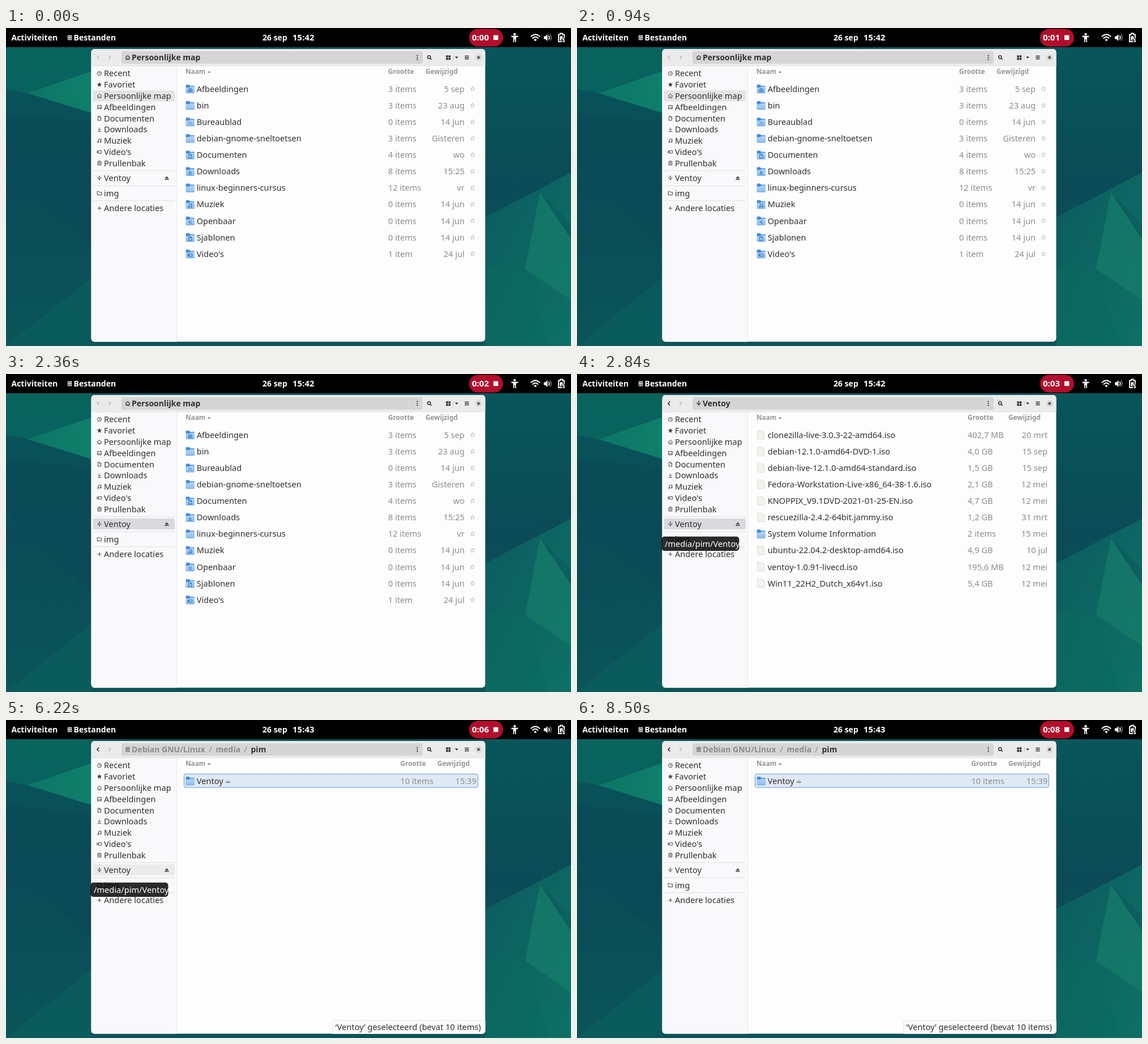
Recreate the animation shown at these times as an HTML page. Size 998 by 561 pixels, loop 8890 ms.

```html
<!DOCTYPE html>
<html lang="nl">
<head>
<meta charset="utf-8">
<title>Bestanden</title>
<style>
html, body { margin: 0; width: 100%; height: 100%; overflow: hidden; background: #0a4f59; }
svg { display: block; width: 100vw; height: 100vh; }
text { font: 14.6px "Noto Sans", sans-serif; fill: #303030; white-space: pre; }
.bold { font-weight: 700; font-size: 14px; }
.time { font-weight: 700; font-size: 15px; }
.head { font-weight: 700; font-size: 11.8px; fill: #969696; }
.dim { fill: #8c8c8c; }
.white { fill: #fff; }
.end { text-anchor: end; }
</style>
</head>
<body>
<svg id="stage" viewBox="0 0 998 561" preserveAspectRatio="none"></svg>
<script>
const LOOP = 8890;
const USER = 'pim';

// Outline icons, centred on the origin, about 8 units wide
const ICONS = {
  clock: 'M-3.5 0a3.5 3.5 0 1 0 7 0a3.5 3.5 0 1 0-7 0M0-2V0H1.8',
  home: 'M-3.8 0L0-3.4L3.8 0M-2.8-.6V3.4H2.8V-.6M0 3.2V1',
  image: 'M-3.3-3H3.3V3H-3.3ZM-2.6 2L-.8 0L.5 1.3L1.6 .3L2.8 2M1.3-1.4h.4',
  doc: 'M-2.6-3.6H.6L2.6-1.5V3.6H-2.6ZM.4-3.4V-1.3H2.4',
  down: 'M0-3.5V1.4M-2.2-.7L0 1.5L2.2-.7M-3.3 3.5H3.3',
  music: 'M-1.4 2V-2.4L3-3.2V1.4M-3.1 2.2a.9 .9 0 1 0 1.7 0a.9 .9 0 1 0-1.7 0M1.2 1.6a.9 .9 0 1 0 1.7 0a.9 .9 0 1 0-1.7 0',
  video: 'M-1.8-2.3H3.5V2.3H-1.8ZM-1.8 0L-4-2V2Z',
  trash: 'M-3.6-2.4H3.6M-1.2-2.6V-3.6H1.2V-2.6M-2.8-2.2V3.5H2.8V-2.2M-.9-.6V2M.9-.6V2',
  usb: 'M0-4V4M-2.7-1.7V.2L0 2L2.7 .2V-1.7M-1-2.8L0-4L1-2.8',
  folder: 'M-3.8 3V-3H-.8L.2-1.8H3.8V3Z',
  plus: 'M-3.5 0H3.5M0-3.5V3.5',
  disk: 'M-3-3.6H3V3.6H-3ZM-1.4-1.8H1.4V.4H-1.4ZM-1.4 2H1.4',
  share: 'M2.4-2.6L-2.2 0L2.4 2.6M2-2.6h.8M-2.6 0h.8M2 2.6h.8',
  desk: 'M-3.2-2h1M2.2-2h1M-.5-2h1M-3.2 2.4h1M2.2 2.4h1M-1.2 .8L0-.6L1.2 .8',
  camera: 'M-3.2-1.8H-1.5L-1-2.8H1L1.5-1.8H3.2V2.8H-3.2ZM-1.2 .5a1.2 1.2 0 1 0 2.4 0a1.2 1.2 0 1 0-2.4 0',
  back: 'M1.7-3.4L-1.7 0L1.7 3.4',
  next: 'M-1.7-3.4L1.7 0L-1.7 3.4',
  search: 'M-3.3-.7a2.6 2.6 0 1 0 5.2 0a2.6 2.6 0 1 0-5.2 0M1.2 1.3L3.7 3.8',
  menu: 'M-3.6-2.6H3.6M-3.6 0H3.6M-3.6 2.6H3.6',
  close: 'M-2-2L2 2M2-2L-2 2'
};

const rect = (x, y, w, h, fill, more = '') =>
  `<rect x="${x}" y="${y}" width="${w}" height="${h}" fill="${fill}" ${more}/>`;
const path = (d, fill, more = '') => `<path d="${d}" fill="${fill}" ${more}/>`;
const text = (x, y, content, cls = '', more = '') =>
  `<text x="${x}" y="${y}" class="${cls}" ${more}>${content}</text>`;
const at = (x, y, body) => `<g transform="translate(${x} ${y})">${body}</g>`;
const icon = (name, x, y, color = '#444', width = 1) =>
  at(x, y, path(ICONS[name], 'none', `stroke="${color}" stroke-width="${width}" stroke-linejoin="round"`));
const group = (id, body) => `<g id="${id}">${body}</g>`;

function star(x, y, r, fill, stroke = 'none') {
  const points = Array.from({ length: 10 }, (_, i) => {
    const a = (i / 5 - .5) * Math.PI, d = i % 2 ? r * .45 : r;
    return `${(x + d * Math.cos(a)).toFixed(2)},${(y + d * Math.sin(a)).toFixed(2)}`;
  });
  return `<polygon points="${points.join(' ')}" fill="${fill}" stroke="${stroke}" stroke-width=".7"/>`;
}

const eject = (x, y, color) => at(x, y, path('M-3.6 .8L0-3.4L3.6 .8ZM-3.6 1.8H3.6V3.2H-3.6Z', color));

function folder(x, y, emblem) {
  return at(x, y,
    path('M-7.5 6V-6.2Q-7.5-7.5-6.2-7.5H-1.7L-.2-5.5H6.3Q7.5-5.5 7.5-4.3V6Z', '#3f8ae0') +
    path('M-7.5-2.4H-1.6L0-4H7.5V6.3Q7.5 7.5 6.3 7.5H-6.3Q-7.5 7.5-7.5 6.3Z', 'url(#folderFront)') +
    path('M-7.3 7.1H7.3', 'none', 'stroke="#65a0df" stroke-width=".9"')) +
    (emblem ? icon(emblem, x, y + 2, '#2d78c8', 1.1) : '');
}

const page = (x, y) => at(x, y,
  path('M-6-7.5H2.5L6-4V7.5H-6Z', '#f3f3ee', 'stroke="#d9d9d3" stroke-width=".9"') +
  path('M2.5-7.5V-4H6Z', '#dfdfd9'));

function wallpaper() {
  return rect(0, 0, 998, 561, 'url(#base)') +
    path('M0 34H151V76L38 115L0 108Z', '#086a60', 'opacity=".65"') +
    path('M38 115L151 76V150Z', 'url(#leftBeam)') +
    path('M0 150L151 165V390L0 240Z', '#0a4655', 'opacity=".35"') +
    path('M0 561L151 440V561Z', '#0b6b60', 'opacity=".35"') +
    path('M846 334L998 255V561H846Z', 'url(#rightSlope)') +
    path('M943 290L917 425L998 480V372Z', '#18806c', 'opacity=".6"') +
    path('M943 290L998 372V345Z', '#0c5a5c', 'opacity=".6"') +
    path('M846 420L917 425L960 561H846Z', '#0a6a60', 'opacity=".55"');
}

function topBar() {
  const white = 'stroke="#fff" stroke-linecap="round"';
  return rect(0, 0, 998, 33.7, '#000') +
    text(9.5, 22, 'Activiteiten', 'bold white') +
    icon('disk', 112.5, 17, '#fff', 1.1) +
    text(119.5, 22, 'Bestanden', 'bold white') +
    text(453, 22, '26 sep', 'bold white') +
    text(506, 22, '', 'time white', 'id="clock"') +
    rect(818, 1.5, 60, 31, '#b30d2b', 'rx="15.5"') +
    text(823, 22, '', 'time white', 'id="counter"') +
    rect(861, 12.7, 8.4, 8.4, '#fff') +
    at(898.5, 17, '<circle cy="-6" r="2.2" fill="#fff"/>' +
      path('M-6-3.3H6V-1.2L2.5-.6V8H.8V3H-.8V8H-2.5V-.6L-6-1.2Z', '#fff')) +
    at(935, 17, path('M-7.5-2.2Q0-9 7.5-2.2M-4.6 .9Q0-3.4 4.6 .9', 'none', white + ' stroke-width="2.1"') +
      '<circle cy="4" r="2.1" fill="#fff"/>') +
    at(957, 17, path('M-7-2.5H-4.2L-.5-6V6L-4.2 2.5H-7Z', '#fff') +
      path('M1.8-2.7Q3.7 0 1.8 2.7', 'none', white + ' stroke-width="1.7"') +
      path('M4-5.5Q8 0 4 5.5', 'none', 'stroke="#888" stroke-width="1.5"')) +
    at(981, 17, path('M-5-5.5H-2V-7.5H2V-5.5H5V7H-5Z', 'none', 'stroke="#fff" stroke-width="1.9" stroke-linejoin="round"') +
      path('M-2.7-2.5H2.7V4.8H-2.7Z', '#fff') +
      path('M4-2L-.2 3.4H2.6L1.5 8L7 2H4Z', '#fff', 'stroke="#000" stroke-width="1"'));
}

function windowFrame() {
  return rect(150, 37.5, 697, 517, '#000', 'rx="6" opacity=".35"') +
    rect(150.5, 37, 696, 516.5, '#fdfdfd', 'rx="6"') +
    path('M150.5 67H301V553.5H156.5Q150.5 553.5 150.5 547.5Z', '#f9f9fb') +
    path('M150.5 67V43Q150.5 37 156.5 37H840.5Q846.5 37 846.5 43V67Z', '#ebebeb') +
    rect(301, 67, 1, 486.5, '#e9e9eb') +
    rect(150.5, 66.5, 696, .8, '#e2e2e2') +
    rect(204, 41, 532, 22, '#d5d5d5', 'rx="4"') +
    icon('next', 183, 52, '#b5b5b5', 1.2) +
    [-3.4, 0, 3.4].map(d => `<circle cx="726.5" cy="${52 + d}" r="1.1" fill="#333"/>`).join('') +
    icon('search', 748, 52, '#2b2b2b', 1.5) +
    [777.3, 781.7].map(x => [48.3, 52.7].map(y => rect(x, y, 3.5, 3.5, '#2b2b2b')).join('')).join('') +
    rect(789.7, 47, .8, 10, '#c8c8c8') +
    path('M793 50.5H799L796 53.8Z', '#2b2b2b') +
    icon('menu', 814, 52, '#2b2b2b', 1.3) +
    '<circle cx="834.7" cy="52" r="6" fill="#d9d9d9"/>' + icon('close', 834.7, 52, '#2b2b2b', 1.3);
}

function sidebar() {
  const places = [
    ['clock', 'Recent'], ['star', 'Favoriet'], ['home', 'Persoonlijke map'], ['image', 'Afbeeldingen'],
    ['doc', 'Documenten'], ['down', 'Downloads'], ['music', 'Muziek'], ['video', "Video's"],
    ['trash', 'Prullenbak']
  ].map(([name, label], i) => [name, label, 80.2 + 19.78 * i]);
  places.push(['usb', 'Ventoy', 264.9], ['folder', 'img', 291.5], ['plus', 'Andere locaties', 318]);
  const highlight = (id, y) => rect(153.5, y - 9.7, 144.5, 19.4, '#e4e4e6', `rx="3" id="${id}"`);
  return highlight('homeRow', 119.7) + highlight('usbRow', 264.5) +
    [251.2, 277.8, 304.3].map(y => rect(153.5, y, 144.5, .9, '#dcdcde')).join('') +
    places.map(([name, label, y]) =>
      (name === 'star' ? star(165, y, 4.6, '#444') : icon(name, 165, y)) + text(173, y + 5.2, label)).join('') +
    eject(284, 264.8, '#444');
}

const rowY = i => 107.5 + 29.1 * i;

function listing(columns, rows) {
  const { size, date, dateEnd, stars } = columns;
  return text(317, 81.3, 'Naam', 'head') + path('M355.5 79H362L358.7 75.5Z', '#969696') +
    text(size, 81.3, 'Grootte', 'head') + text(date, 81.3, 'Gewijzigd', 'head') +
    rows.map(([name, amount, changed, emblem], i) => {
      const y = rowY(i);
      return (name.endsWith('.iso') ? page(325, y) : folder(325.3, y, emblem)) +
        text(336.7, y + 5.2, name) + text(size, y + 5.2, amount, 'dim') +
        text(dateEnd, y + 5.2, changed, 'dim end') +
        (stars ? star(824, y, 4.2, 'none', '#a6a6a6') : '');
    }).join('');
}

function homeView() {
  return icon('back', 162.5, 52, '#b5b5b5', 1.2) + icon('home', 215, 52, '#333', 1.2) +
    text(222, 57.2, 'Persoonlijke map', 'bold') +
    listing({ size: 675, date: 741, dateEnd: 810, stars: true }, [
      ['Afbeeldingen', '3 items', '5 sep', 'camera'],
      ['bin', '3 items', '23 aug'],
      ['Bureaublad', '0 items', '14 jun', 'desk'],
      ['debian-gnome-sneltoetsen', '3 items', 'Gisteren'],
      ['Documenten', '4 items', 'wo', 'doc'],
      ['Downloads', '8 items', '15:25', 'down'],
      ['linux-beginners-cursus', '12 items', 'vr'],
      ['Muziek', '0 items', '14 jun', 'music'],
      ['Openbaar', '0 items', '14 jun', 'share'],
      ['Sjablonen', '0 items', '14 jun', 'doc'],
      ["Video's", '1 item', '24 jul', 'video']
    ]);
}

function usbView() {
  return icon('back', 162.5, 52, '#2b2b2b', 1.5) + icon('usb', 215, 52, '#333', 1.2) +
    text(222, 57.2, 'Ventoy', 'bold') +
    listing({ size: 690, date: 762, dateEnd: 831 }, [
      ['clonezilla-live-3.0.3-22-amd64.iso', '402,7 MB', '20 mrt'],
      ['debian-12.1.0-amd64-DVD-1.iso', '4,0 GB', '15 sep'],
      ['debian-live-12.1.0-amd64-standard.iso', '1,5 GB', '15 sep'],
      ['Fedora-Workstation-Live-x86_64-38-1.6.iso', '2,1 GB', '12 mei'],
      ['KNOPPIX_V9.1DVD-2021-01-25-EN.iso', '4,7 GB', '12 mei'],
      ['rescuezilla-2.4.2-64bit.jammy.iso', '1,2 GB', '31 mrt'],
      ['System Volume Information', '2 items', '15 mei'],
      ['ubuntu-22.04.2-desktop-amd64.iso', '4,9 GB', '10 jul'],
      ['ventoy-1.0.91-livecd.iso', '195,6 MB', '12 mei'],
      ['Win11_22H2_Dutch_x64v1.iso', '5,4 GB', '12 mei']
    ]);
}

function mediaView() {
  return icon('back', 162.5, 52, '#2b2b2b', 1.5) + icon('disk', 215, 52, '#777', 1.2) +
    text(222, 57.2, 'Debian GNU/Linux', 'bold dim') + text(358.5, 57.2, '/', 'dim') +
    text(370.5, 57.2, 'media', 'bold dim') + text(420.5, 57.2, '/', 'dim') +
    text(432.5, 57.2, USER, 'bold') +
    rect(314.5, 95.2, 519, 23.8, '#e0eaf6', 'rx="3" stroke="#5c9de4"') +
    listing({ size: 696.5, date: 762, dateEnd: 831 }, [['Ventoy', '10 items', '15:39']]) +
    path('M388.5 108.3L392 105.5L395.5 108.3Z', '#b9b9b9') + rect(388.3, 109.3, 7.4, 1.3, '#555');
}

const statusBar = () =>
  path('M846.5 530H581Q576.5 530 576.5 534.5V553.5H840.5Q846.5 553.5 846.5 547.5Z', '#fbfbfb', 'stroke="#e2e2e2" stroke-width=".9"') +
  text(839, 547.2, '‘Ventoy’ geselecteerd (bevat 10 items)', 'end');

const tooltip = () =>
  rect(149.5, 286.8, 137, 25.2, '#000', 'rx="5" opacity=".83"') +
  text(155, 304.7, `/media/${USER}/Ventoy`, 'white');

const gradient = (id, attrs, ...stops) => `<linearGradient id="${id}" ${attrs}>` +
  stops.map(([offset, color]) => `<stop offset="${offset}" stop-color="${color}"/>`).join('') + '</linearGradient>';

document.getElementById('stage').innerHTML = '<defs>' +
  gradient('base', 'x1="0" y1="0" x2="0" y2="1"', [0, '#08575b'], [.5, '#0a4b57'], [1, '#0a555a']) +
  gradient('leftBeam', '', [0, '#0d7566'], [1, '#0f7f6a']) +
  gradient('rightSlope', 'x1="0" y1="0" x2="1" y2="1"', [0, '#0c5b5e'], [1, '#0d7165']) +
  gradient('folderFront', 'x1="0" y1="0" x2="0" y2="1"', [0, '#b4d5f5'], [1, '#8cbdee']) +
  '</defs>' + wallpaper() + topBar() + windowFrame() + sidebar() +
  group('home', homeView()) + group('usb', usbView()) + group('media', mediaView()) +
  group('status', statusBar()) + group('tip', tooltip());

const el = id => document.getElementById(id);
const show = (id, visible) => { el(id).style.display = visible ? '' : 'none'; };
const ramp = (t, from, to) => Math.min(1, Math.max(0, (t - from) / (to - from)));

function draw(t) {
  const between = (from, to) => t >= from && t < to;
  el('clock').textContent = t < 3730 ? '15:42' : '15:43';
  el('counter').textContent = `0:0${Math.floor((t + 160) / 1000)}`;
  show('home', t < 2400);
  show('usb', between(2400, 5700));
  show('media', t >= 5700);
  show('status', t >= 6000);
  show('tip', between(2840, 5100) || between(6190, 7430));
  show('homeRow', t < 2360);
  el('usbRow').setAttribute('fill', between(2360, 5700) ? '#d9d9de' : '#ebebec');
  el('usbRow').setAttribute('opacity', ramp(t, 2130, 2200) * (1 - ramp(t, 7400, 7470)));
}

function tick() {
  draw(performance.now() % LOOP);
  requestAnimationFrame(tick);
}
tick();
</script>
</body>
</html>
```
